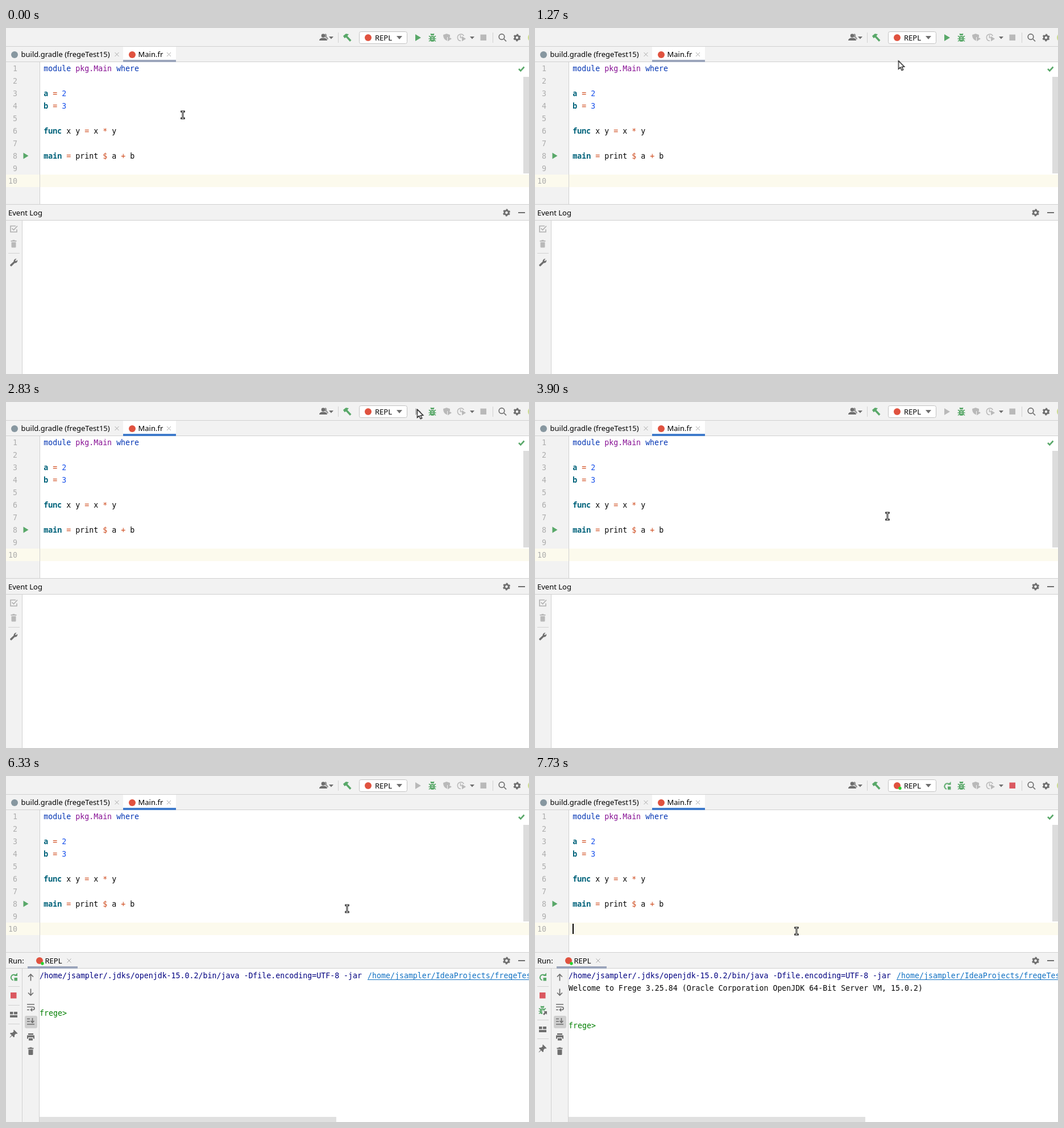
Recreate the animation shown at these times as an HTML page. Size 920x609 px, loop 8 s.

```html
<!DOCTYPE html>
<html lang="en">
<head>
<meta charset="utf-8">
<title>REPL run</title>
<style>
html, body { margin: 0; width: 100%; height: 100%; overflow: hidden; background: #fff; }
svg { display: block; width: 100vw; height: 100vh; }
text { white-space: pre; }
.ui { font: 13px "Noto Sans", "Open Sans", sans-serif; fill: #000; }
.code { font: 13.288px "DejaVu Sans Mono", "Noto Sans Mono", monospace; fill: #080808; }
.key { fill: #0033b3; }
.pkg { fill: #871094; }
.def { fill: #00627a; font: 600 13.333px "Noto Sans Mono", "DejaVu Sans Mono", monospace; }
.op { fill: #cf4a1c; }
.num { fill: #1750eb; }
.command { fill: #000080; }
.link { fill: #0f70c2; }
.input { fill: #007f00; }
.lines { fill: #adadad; text-anchor: end; }
.bar { fill: #f2f2f2; }
.rule { fill: #d1d1d1; }
.green { fill: #59a869; }
.red { fill: #db5860; }
.dark { fill: #6e6e6e; }
.dim { fill: #b9b9b9; }
.logo { fill: #e0523f; }
.live { fill: #27d22d; }
.stroke { fill: none; stroke: #6e6e6e; stroke-width: 1.7; }
.thin { stroke: #a8a8a8; stroke-width: 1; fill: none; }

/* One loop is 8 s, so 1% = 80 ms */
.step { animation: 8s step-end infinite; }
.log { animation-name: log; }
.run { animation-name: run; }
.ready { animation-name: ready; }
.prompt { animation-name: prompt; }
.attach { animation-name: attach; }
.shift { animation-name: shift; }
.caret { animation-name: caret; }
.focus { animation-name: focus; }
.hover { animation-name: hover; }
.play { animation-name: play; }
.busy { animation-name: busy; }
.idle { animation-name: idle; }
.arrow { animation-name: arrow; }
.beam { animation-name: beam; }
.pointer { animation: pointer 8s linear infinite; }

@keyframes log { 0% { opacity: 1 } 79.125% { opacity: 0 } }
@keyframes run { 0% { opacity: 0 } 79.125% { opacity: 1 } }
@keyframes ready { 0% { opacity: 0 } 83.375% { opacity: 1 } }
@keyframes idle { 0% { opacity: 1 } 83.375% { opacity: 0 } }
@keyframes prompt { 0% { transform: none } 83.375% { transform: translateY(22px) } }
@keyframes attach { 0% { opacity: 0 } 90.875% { opacity: 1 } }
@keyframes shift { 0% { transform: none } 90.875% { transform: translateY(26px) } }
@keyframes focus { 0% { fill: #9ba5bb } 27.125% { fill: #3f7bcb } }
@keyframes hover { 0% { opacity: 0 } 18.75% { opacity: 1 } 30.375% { opacity: 0 } }
@keyframes play { 0% { opacity: 1 } 29.125% { opacity: 0 } }
@keyframes busy { 0% { opacity: 0 } 29.125% { opacity: 1 } 83.375% { opacity: 0 } }
@keyframes arrow { 0% { opacity: 0 } 15.6% { opacity: 1 } 46.125% { opacity: 0 } }
@keyframes beam { 0% { opacity: 1 } 15.6% { opacity: 0 } 46.125% { opacity: 1 } }
@keyframes caret {
  0%, 35.375%, 48.375%, 60%, 72.875%, 90.875% { opacity: 0 }
  27.125%, 42.125%, 54.125%, 67.5%, 85%, 96.625% { opacity: 1 }
}
@keyframes pointer {
  0% { transform: translate(311px, 153px); animation-timing-function: step-end }
  1.25%, 7.125% { transform: translate(325px, 171px) }
  9.625% { transform: translate(398px, 171px) }
  10.875% { transform: translate(455px, 156px) }
  13% { transform: translate(455px, 156px); animation-timing-function: ease-out }
  18.75%, 45.5% { transform: translate(723.5px, 13px) }
  47.5% { transform: translate(620px, 201px); animation-timing-function: step-end }
  55.875% { transform: translate(610px, 217px); animation-timing-function: step-end }
  57.125% { transform: translate(600px, 233.5px); animation-timing-function: step-end }
  89.125%, 95% { transform: translate(592px, 234px) }
  96.625%, 100% { transform: translate(460px, 273px) }
}
</style>
</head>
<body>
<svg viewBox="0 0 920 609" preserveAspectRatio="none">
  <defs>
    <path id="tri" d="M-5 -6L5 0L-5 6Z"/>
    <path id="drop" d="M-4 -2H4L0 2.5Z"/>
    <path id="close" class="thin" d="M-3.5 -3.5L3.5 3.5M3.5 -3.5L-3.5 3.5"/>
    <g id="gear" fill="none" stroke="#6e6e6e" transform="rotate(15)">
      <circle r="3.7" stroke-width="2.8"/>
      <circle r="5.4" stroke-width="2.2" stroke-dasharray="2.83 2.83"/>
    </g>
    <g id="bug">
      <path d="M-3 -4A3 3 0 0 1 3 -4Z"/>
      <rect x="-4" y="-3" width="8" height="10" rx="3.5"/>
      <path d="M-6 -3L-3 -1M6 -3L3 -1M-6.5 2H6.5M-6 6.5L-3 4M6 6.5L3 4M-3 -7L-1 -5M3 -7L1 -5" stroke="#59a869" stroke-width="1.6"/>
      <path d="M-2 0H2M-2 3H2" stroke="#f2f2f2"/>
    </g>
    <g id="rerun">
      <path d="M3.5 -3.2A5 5 0 1 0 -1 5.5" fill="none" stroke="#59a869" stroke-width="2"/>
      <path d="M1 -2H6.5V-7.5Z"/>
      <rect x="1" y="1" width="5.5" height="5.5"/>
    </g>
    <path id="trash" d="M-5 -6H-2V-7H2V-6H5V-4H-5ZM-4 -3H4V5Q4 6.5 2.5 6.5H-2.5Q-4 6.5 -4 5Z"/>
    <path id="wrench" d="M-6.5 4L0 -2A4 4 0 0 1 5 -6.5L2.5 -4L4 -2.4L6.5 -4.8A4 4 0 0 1 2 0.6L-4 6.5Q-6 6.5 -6.5 4Z"/>
    <path id="ibeam" d="M-2.3 -6H2.3M0 -6V6M-2.3 6H2.3"/>
  </defs>

  <rect width="920" height="609" fill="#fff"/>

  <!-- main toolbar -->
  <rect class="bar" width="920" height="59"/>
  <rect class="rule" y="32" width="920" height="1"/>
  <g class="dark">
    <circle cx="558" cy="13.5" r="3.3"/>
    <path d="M551 22Q551 18.5 555.5 17.5H560.5Q565 18.5 565 22Z"/>
    <path d="M561 10Q565 10 564 15Q567 17 567 20H565Q564 17 561 16Z" opacity=".7"/>
    <use href="#drop" x="572" y="17"/>
    <use href="#drop" x="820" y="17"/>
  </g>
  <rect class="rule" x="584" y="8" width="1" height="18"/>
  <path class="green" d="M593 14L598 10L603 11L600.5 14L607.5 21.5L605 24L598 16.5L595.5 18Z"/>
  <rect x="621.5" y="6.5" width="84" height="21" rx="3" fill="#fff" stroke="#c2c2c2"/>
  <circle class="logo" cx="637" cy="17" r="6"/>
  <circle class="live step ready" cx="642" cy="21.5" r="2.7"/>
  <text class="ui" x="649" y="22">REPL</text>
  <path class="dark" d="M687 14H697L692 20Z"/>

  <rect class="step hover" x="714" y="6" width="21" height="22" rx="3" fill="#dcdcdc"/>
  <use class="green step play" href="#tri" x="725" y="17"/>
  <use class="dim step busy" href="#tri" x="725" y="17"/>
  <use class="green step ready" href="#rerun" x="725" y="17.5"/>
  <use class="green" href="#bug" x="750" y="17"/>
  <g class="dim">
    <path d="M769 12L775 10L781 12V16H776V22.5Q769 20 769 12Z"/>
    <path d="M777 14.5L784 19L777 23.5Z"/>
    <path d="M802 14.5L809 19L802 23.5Z"/>
  </g>
  <path fill="none" stroke="#b9b9b9" stroke-width="1.6" d="M800 22.5A5.8 5.8 0 1 1 805.3 14M799.5 12.5V17H802"/>
  <rect class="dim step idle" x="834.5" y="11.5" width="10.5" height="10.5"/>
  <rect class="red step ready" x="834.5" y="11.5" width="10.5" height="10.5"/>
  <rect class="rule" x="856" y="8" width="1" height="18"/>
  <path class="stroke" d="M876 19.5L880 23.5"/>
  <circle class="stroke" cx="872" cy="15.5" r="4.8"/>
  <use href="#gear" x="899" y="17"/>
  <circle cx="926" cy="17" r="8" fill="#cbdc8c"/>

  <!-- tabs -->
  <rect x="206" y="33" width="93" height="26" fill="#fff"/>
  <rect class="rule" y="59" width="920" height="1"/>
  <rect class="step focus" x="206" y="56" width="93" height="4"/>
  <circle cx="15" cy="47" r="6" fill="#8797a0"/>
  <text class="ui" x="26.5" y="51">build.gradle (fregeTest15)</text>
  <use href="#close" x="195" y="46.5"/>
  <circle class="logo" cx="222" cy="47" r="6"/>
  <text class="ui" x="232.5" y="51">Main.fr</text>
  <use href="#close" x="286.5" y="46.5"/>

  <!-- editor -->
  <rect class="bar" y="60" width="60" height="251"/>
  <rect y="258" width="920" height="22" fill="#fcfaed"/>
  <rect class="rule" x="59" y="60" width="1" height="251"/>
  <rect x="910" y="86" width="10" height="170" fill="#dcdcdc"/>
  <path d="M902 72L905.3 75.3L911.5 68.5" fill="none" stroke="#59a869" stroke-width="2.6"/>
  <g class="code lines" id="lines"></g>
  <path class="green" d="M30.5 219.5L39.5 225L30.5 230.5Z"/>
  <g class="code">
    <text x="66.3" y="76"><tspan class="key">module</tspan> <tspan class="pkg">pkg.Main</tspan> <tspan class="key">where</tspan></text>
    <text x="66.3" y="120"><tspan class="def">a</tspan> <tspan class="op">=</tspan> <tspan class="num">2</tspan></text>
    <text x="66.3" y="142"><tspan class="def">b</tspan> <tspan class="op">=</tspan> <tspan class="num">3</tspan></text>
    <text x="66.3" y="186"><tspan class="def">func</tspan> x y <tspan class="op">=</tspan> x <tspan class="op">*</tspan> y</text>
    <text x="66.3" y="230"><tspan class="def">main</tspan> <tspan class="op">=</tspan> print <tspan class="op">$</tspan> a <tspan class="op">+</tspan> b</text>
  </g>
  <rect class="step caret" x="66" y="260" width="2" height="18"/>

  <!-- tool window -->
  <rect class="bar" y="311" width="920" height="28"/>
  <rect class="rule" y="310" width="920" height="1"/>
  <rect class="rule" y="338" width="920" height="1"/>
  <use href="#gear" x="880.5" y="325"/>
  <rect class="dark" x="901" y="324" width="12" height="2"/>
  <rect class="bar" y="339" width="28" height="270"/>
  <rect class="rule" x="28" y="339" width="1" height="270"/>

  <g class="step log">
    <text class="ui" x="4" y="329.5">Event Log</text>
    <path fill="none" stroke="#b0b0b0" stroke-width="1.6" d="M17 348.5H8V359H19V354.5M10.5 352.5L13.5 355.5L20 348.5"/>
    <use class="dim" href="#trash" x="13.5" y="380"/>
    <rect class="rule" x="4" y="396" width="20" height="1"/>
    <use class="dark" href="#wrench" x="13.5" y="413"/>
  </g>

  <g class="step run">
    <text class="ui" x="4" y="329.5">Run:</text>
    <rect x="38" y="335" width="88" height="4" fill="#9ba5bb"/>
    <circle class="logo" cx="59" cy="325" r="6"/>
    <circle class="live" cx="64" cy="330" r="2.7"/>
    <text class="ui" x="68.5" y="329.5">REPL</text>
    <use href="#close" x="111" y="325"/>

    <use class="green" href="#rerun" x="13.5" y="354"/>
    <rect class="rule" x="4" y="370" width="20" height="1"/>
    <rect class="red" x="8" y="381" width="10.5" height="10.5"/>
    <g class="step attach">
      <use class="green" href="#bug" x="13" y="412"/>
      <path d="M13 413H22V421H13Z" fill="#f2f2f2"/>
      <path class="dark" d="M15 414H21V420L19 418L16 421L14 419L17 416Z"/>
    </g>
    <g class="step shift">
      <rect class="rule" x="4" y="403" width="20" height="1"/>
      <path class="dark" d="M7 415H12.5V419.5H7ZM14 415H20V419.5H14ZM7 421H20V425H7Z"/>
      <rect class="rule" x="4" y="436" width="20" height="1"/>
      <path class="dark" d="M14 446.5L20.5 453L19 454L17.5 453.5L15 456V459L13.5 460L10.8 457L7 460.5L6.5 460L10 456L7 453.5L8 452H11L13.7 449.5L13 448Z"/>
    </g>

    <rect class="bar" x="29" y="339" width="29" height="270"/>
    <rect class="rule" x="58" y="339" width="1" height="270"/>
    <rect x="33" y="422" width="22" height="22" rx="3" fill="#cfcfcf"/>
    <path class="stroke" d="M43.5 360.5V349M39 353.5L43.5 349L48 353.5M43.5 374.5V386M39 381.5L43.5 386L48 381.5"/>
    <path class="stroke" d="M37 402H50M37 406.5H47.5A2.3 2.3 0 0 1 47.5 411.5H44M37 411.5H41M46 409L43.5 411.5L46 414"/>
    <path class="stroke" d="M37 427.5H42M37 432H42M37 437H50M46.5 426V433.5M43.5 431L46.5 434L49.5 431"/>
    <path class="dark" d="M39 453H48V455.5H39ZM37 456.5H50V462.5H48V460H39V462.5H37ZM40 461.5H47V465.5H40Z"/>
    <use class="dark" href="#trash" x="43.5" y="484.5"/>

    <g class="code">
      <text class="command" x="59" y="356">/home/jsampler/.jdks/openjdk-15.0.2/bin/java -Dfile.encoding=UTF-8 -jar</text>
      <text class="link" x="636" y="356">/home/jsampler/IdeaProjects/fregeTest15</text>
      <rect class="link" x="636" y="358" width="284" height="1"/>
      <text class="step ready" x="59" y="378">Welcome to Frege 3.25.84 (Oracle Corporation OpenJDK 64-Bit Server VM, 15.0.2)</text>
      <text class="input step prompt" x="59" y="422">frege&gt;</text>
    </g>
    <rect x="59" y="600" width="522" height="9" fill="#e0e0e0"/>
  </g>

  <!-- mouse pointer -->
  <g class="pointer">
    <g class="step beam" fill="none">
      <use href="#ibeam" stroke="#000" stroke-width="2.8" stroke-linecap="square"/>
      <use href="#ibeam" stroke="#fff"/>
    </g>
    <path class="step arrow" d="M0 0V14.5L3.3 11.4L5.6 16.8L8.2 15.7L5.9 10.5H10.3Z" fill="#fff" stroke="#000" stroke-width="1.2"/>
  </g>
</svg>
<script>
const lines = document.getElementById("lines");
for (let n = 1; n <= 10; n++) {
  const label = document.createElementNS(lines.namespaceURI, "text");
  label.setAttribute("x", 20);
  label.setAttribute("y", 54 + 22 * n);
  label.textContent = n;
  lines.append(label);
}
</script>
</body>
</html>
```
